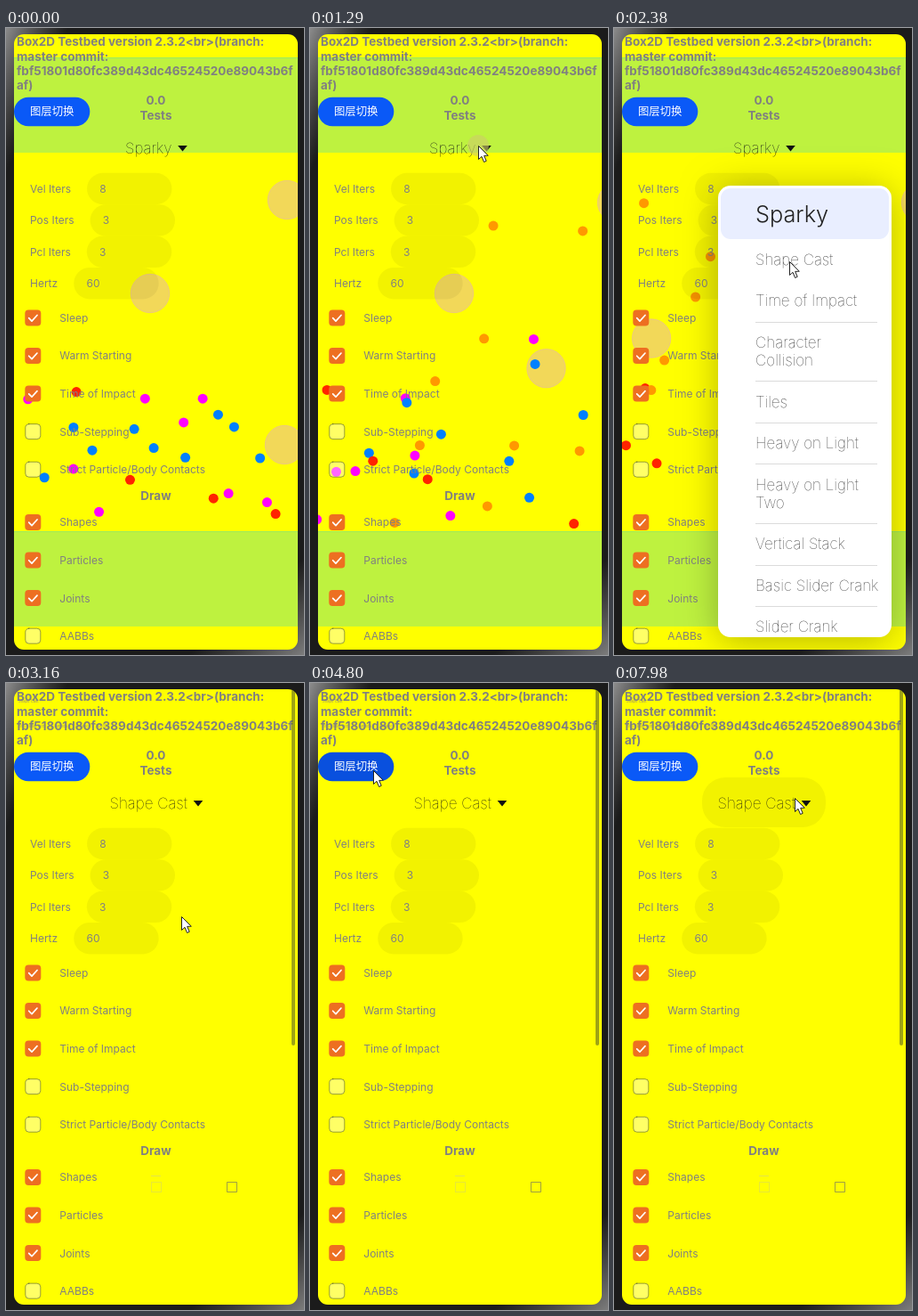
An HTML page with a canvas for the animation above (8000 ms loop, 335 px wide and 704 px high).

```html
<!DOCTYPE html>
<html lang="en">
<head>
<meta charset="utf-8">
<title>Testbed</title>
<style>
  html, body { margin: 0; width: 100%; height: 100%; overflow: hidden; background: #1b1b1b; }
  canvas { display: block; width: 335px; height: 704px; }
</style>
</head>
<body>
<canvas id="stage"></canvas>
<script>
const W = 335, H = 704, LOOP = 8000, STEP = 71.9;
const canvas = document.getElementById('stage');
const ctx = canvas.getContext('2d');
const dpr = window.devicePixelRatio || 1;
canvas.width = W * dpr;
canvas.height = H * dpr;

const GRAY = '#808080', ORANGE = '#ed6f21', PILL = 'rgba(0,0,0,.05)';
const SANS = 'Inter, Roboto, sans-serif';
const PLAIN = '12px ' + SANS, BOLD = 'bold 13.5px ' + SANS, THIN = '100 17px ' + SANS;
const SCENE_CUT = 3030, HIDE = 4800, SHOW = 6670;

const clamp = v => Math.max(0, Math.min(1, v));
const lerp = (a, b, u) => a + (b - a) * u;
const smooth = u => u * u * (3 - 2 * u);
const easeOut = u => 1 - (1 - u) ** 3;
const phase = (t, start, end) => clamp((t - start) / (end - start));

// Bounces a coordinate between two walls.
function bounce(v, lo, hi) {
  const span = hi - lo, m = (((v - lo) % (2 * span)) + 2 * span) % (2 * span);
  return lo + (m < span ? m : 2 * span - m);
}

function seeded(seed) {
  return (lo, hi) => {
    seed = (seed * 1664525 + 1013904223) % 4294967296;
    return lerp(lo, hi, seed / 4294967296);
  };
}

function box(x, y, w, h, r, fill, stroke) {
  ctx.beginPath();
  ctx.roundRect(x, y, w, h, r);
  if (fill) { ctx.fillStyle = fill; ctx.fill(); }
  if (stroke) { ctx.strokeStyle = stroke; ctx.lineWidth = 1; ctx.stroke(); }
}

function disc(x, y, r, fill) {
  ctx.beginPath();
  ctx.arc(x, y, r, 0, Math.PI * 2);
  ctx.fillStyle = fill;
  ctx.fill();
}

function text(s, x, y, font, fill, align = 'left') {
  ctx.font = font;
  ctx.fillStyle = fill;
  ctx.textAlign = align;
  ctx.fillText(s, x, y);
}

// ---- simulation ----
const ARENA = { left: 2, right: 345, top: 140, bottom: 565 };
const BODIES = [
  { from: [316, 193], to: [345, 196], start: 0, end: 900 },
  { from: [162, 298], to: [41, 349], start: 1590, end: 2380 },
  { from: [313, 468], to: [240, 336], start: 0, end: 1990 }
];

const rand = seeded(12);

// Debris already drifting through the lower half of the arena.
const scatter = (color, count, end) => Array.from({ length: count }, (_, i) => {
  const angle = rand(0, Math.PI * 2), speed = rand(.03, .12);
  return {
    color, end, start: 0,
    x: lerp(20, 315, (i + rand(.1, .9)) / count), y: rand(400, 550),
    vx: speed * Math.cos(angle), vy: speed * Math.sin(angle)
  };
});

// A fan of debris thrown leftwards from one impact.
const fan = (color, count, x, y, start) => Array.from({ length: count }, (_, i) => {
  const angle = Math.PI * lerp(1.47, .55, i / (count - 1)), speed = rand(.15, .33);
  return {
    color, x, y, start, end: SCENE_CUT,
    vx: speed * Math.cos(angle), vy: speed * Math.sin(angle)
  };
});

const sparks = [
  ...scatter('#ff00ff', 8, 1580),
  ...scatter('#0080ff', 9, 1800),
  ...scatter('#ff2400', 4, SCENE_CUT),
  ...fan('#ff9800', 9, 330, 475, 400)
];

function drawSparky(t) {
  for (const y of [33, 565]) {
    ctx.fillStyle = 'rgba(127,229,127,.5)';
    ctx.fillRect(9, y, 319, 107);
    ctx.fillRect(9, y, 319, 1);
  }
  for (const { from, to, start, end } of BODIES) {
    const u = phase(t, start, end);
    disc(lerp(from[0], to[0], u), lerp(from[1], to[1], u), 21.7, 'rgba(229,178,178,.5)');
    ctx.strokeStyle = 'rgba(229,178,178,.7)';
    ctx.lineWidth = .8;
    ctx.stroke();
  }
  for (const s of sparks) {
    const age = t - s.start;
    if (age < 0 || t > s.end) continue;
    disc(bounce(s.x + s.vx * age, ARENA.left, ARENA.right),
         bounce(s.y + s.vy * age, ARENA.top + 5, ARENA.bottom - 5), 5.5, s.color);
  }
}

function drawCast() {
  const tiny = '4.2px ' + SANS, ink = 'rgba(140,125,125,.85)';
  text('Shape Cast', 14, 21.5, tiny, ink);
  text('hit = false, iters = 3, lambda = 1, distance = 7.04023', 14, 49.5, tiny, ink);
  ctx.setLineDash([1, 1]);
  box(163.5, 560.5, 11, 11, 0, null, 'rgba(190,190,150,.75)');
  ctx.setLineDash([]);
  ctx.fillStyle = 'rgba(200,200,150,.5)';
  ctx.fillRect(163, 553, 11, 1);
  box(248.5, 560.5, 11, 11, 0, null, 'rgba(128,128,90,.75)');
}

// ---- controls ----
const HEADER = [
  'Box2D Testbed version 2.3.2<br>(branch:', 'master commit:',
  'fbf51801d80fc389d43dc46524520e89043b6f', 'af)'
];
const FIELDS = { 'Vel Iters': 8, 'Pos Iters': 3, 'Pcl Iters': 3, 'Hertz': 60 };
const SOLVER = ['Sleep', 'Warm Starting', 'Time of Impact', 'Sub-Stepping', 'Strict Particle/Body Contacts'];
const DRAWN = ['Shapes', 'Particles', 'Joints', 'AABBs'];

function drawCheck(label, y, on) {
  if (on) {
    box(21.3, y - 9, 18, 18, 4, ORANGE);
    ctx.beginPath();
    ctx.moveTo(25.7, y + .2);
    ctx.lineTo(29, y + 3.6);
    ctx.lineTo(35, y - 3);
    ctx.strokeStyle = '#fff';
    ctx.lineWidth = 1.7;
    ctx.lineCap = ctx.lineJoin = 'round';
    ctx.stroke();
  } else {
    box(21.8, y - 8.5, 17, 17, 4, 'rgba(255,255,255,.4)', 'rgba(24,36,49,.45)');
  }
  text(label, 60.3, y + 4.4, PLAIN, GRAY);
}

function drawChecks(labels, top) {
  labels.forEach((label, i) => drawCheck(label, top + i * 42.55, i < 3));
}

function drawField([label, value], i) {
  const y = 180.5 + i * 35.4;
  text(label, 27, y + 4.3, PLAIN, GRAY);
  const left = 27 + ctx.measureText(label).width + 18;
  box(left, y - 17.7, 95.5, 35.4, 17.7, PILL);
  text(value, left + 14.3, y + 4.3, PLAIN, GRAY);
}

function drawSelect(t) {
  const hover = phase(t, 7640, 7840);
  if (hover > 0) box(99, 106, 139, 56, 26, `rgba(0,0,0,${.05 * hover})`);
  const cast = t >= SCENE_CUT;
  text(cast ? 'Shape Cast' : 'Sparky', cast ? 116.5 : 134, 140.7, THIN, '#111');
  const x = cast ? 216 : 198.5;
  ctx.beginPath();
  ctx.moveTo(x - 5.3, 132);
  ctx.lineTo(x + 5.3, 132);
  ctx.lineTo(x, 138.5);
  ctx.fillStyle = '#111';
  ctx.fill();
}

function drawControls(t) {
  HEADER.forEach((s, i) => text(s, 12, 20.2 + i * 16.4, BOLD, GRAY));
  text('0.0', 168.5, 86, BOLD, GRAY, 'center');
  text('Tests', 168.5, 102.7, BOLD, GRAY, 'center');
  text('Draw', 168.5, 530, BOLD, GRAY, 'center');
  drawSelect(t);
  Object.entries(FIELDS).forEach(drawField);
  drawChecks(SOLVER, 325.5);
  drawChecks(DRAWN, 555);
  if (t >= SCENE_CUT) box(321, 7, 4, 400, 2, 'rgba(24,36,49,.42)');
}

function drawButton(t) {
  const pressed = (t >= HIDE - 150 && t < HIDE) || (t >= SHOW - 150 && t < SHOW);
  box(9, 77.8, 85.3, 32.4, 16.2, pressed ? '#0950de' : '#0a59f7');
  text('图层切换', 51.7, 98.3, '500 12.4px "Noto Sans CJK SC", "Noto Sans CJK", sans-serif', '#fff', 'center');
}

// ---- drop-down ----
const MENU = { x: 117, y: 177, w: 195, h: 507, r: 14 };
const TESTS = [
  'Shape Cast', 'Time of Impact', 'Character\nCollision', 'Tiles', 'Heavy on Light',
  'Heavy on Light\nTwo', 'Vertical Stack', 'Basic Slider Crank', 'Slider Crank'
];

function drawTests() {
  let y = 266;
  TESTS.forEach((name, i) => {
    name.split('\n').forEach((line, row) => {
      if (row) y += 20.5;
      text(line, 159, y, THIN, '#222');
    });
    ctx.fillStyle = 'rgba(0,0,0,.14)';
    if (i) ctx.fillRect(159, Math.round(y + 17.2), 137, 1);   // the hovered row has no rule
    y += 46.4;
  });
}

function drawMenu(t) {
  const open = easeOut(phase(t, 1400, 1720)) * (1 - smooth(phase(t, 2500, 2880)));
  if (open <= 0) return;
  const { x, y, w, h, r } = MENU, cx = x + w / 2, cy = y + h / 2;
  const scale = .94 + .06 * open;
  ctx.save();
  ctx.globalAlpha = open;
  ctx.translate(cx, cy);
  ctx.scale(scale, scale);
  ctx.translate(-cx, -cy);
  ctx.save();
  ctx.shadowColor = 'rgba(0,0,0,.28)';
  ctx.shadowBlur = 40 * dpr;
  ctx.shadowOffsetY = 4 * dpr;
  box(x, y, w, h, r, '#fff');
  ctx.restore();
  ctx.beginPath();
  ctx.roundRect(x, y, w, h, r);
  ctx.clip();
  box(x + 3, y + 3, w - 6, 57, r - 3, t < 1700 ? '#e8ebec' : '#e9eeff');
  text('Sparky', 159, 218, '300 25.3px ' + SANS, '#222');
  drawTests();
  ctx.restore();
}

// ---- pointer ----
// Each move: start, end, and the place reached.
const MOVES = [
  [210, 640, 188, 143], [930, 1290, 189, 132], [2090, 2310, 197, 262],
  [3890, 4290, 71, 98], [6600, 7540, 203, 129]
];
const TAPS = [1285, 2525, 4495, 6365];

function pointerAt(t) {
  return MOVES.reduce(([x, y], [start, end, toX, toY]) => {
    const u = smooth(phase(t, start, end));
    return [lerp(x, toX, u), lerp(y, toY, u)];
  }, [340, 660]);
}

function drawPointer(t) {
  if (t < 210) return;
  const [x, y] = pointerAt(t);
  if (TAPS.some(tap => t >= tap && t < tap + 145)) disc(x, y, 12, 'rgba(205,205,105,.62)');
  ctx.save();
  ctx.translate(x, y);
  ctx.beginPath();
  [[.5, .5], [.5, 15.5], [4, 12.3], [6.6, 18.5], [9.2, 17.3], [6.7, 11.4], [11.3, 11.2]]
    .forEach(p => ctx.lineTo(...p));
  ctx.closePath();
  ctx.lineJoin = 'miter';
  ctx.fillStyle = '#fff';
  ctx.fill();
  ctx.strokeStyle = '#222';
  ctx.lineWidth = 1;
  ctx.stroke();
  ctx.restore();
}

function glow(x0, y0, x1, y1, color) {
  const g = ctx.createLinearGradient(x0, y0, x1, y1);
  g.addColorStop(0, color);
  g.addColorStop(1, 'rgba(110,110,110,0)');
  ctx.fillStyle = g;
  ctx.fillRect(0, 0, W, H);
}

function render(t) {
  ctx.setTransform(dpr, 0, 0, dpr, 0, 0);
  ctx.fillStyle = '#1b1b1b';
  ctx.fillRect(0, 0, W, H);
  glow(0, 0, 59, 25, '#8c8c8c');
  glow(W, H, 281, 640, '#7c7c7c');

  ctx.save();
  box(9, 7, 319, 691, 11, '#ffff00');
  ctx.clip();
  if (t < SCENE_CUT) drawSparky(t); else drawCast();
  if (t < HIDE || t >= SHOW) drawControls(t);
  drawButton(t);
  drawMenu(t);
  ctx.restore();
  drawPointer(t);
}

function tick(now) {
  const k = Math.floor((now % LOOP + 10) / STEP);
  render(k * STEP);
  requestAnimationFrame(tick);
}
requestAnimationFrame(tick);
</script>
</body>
</html>
```
